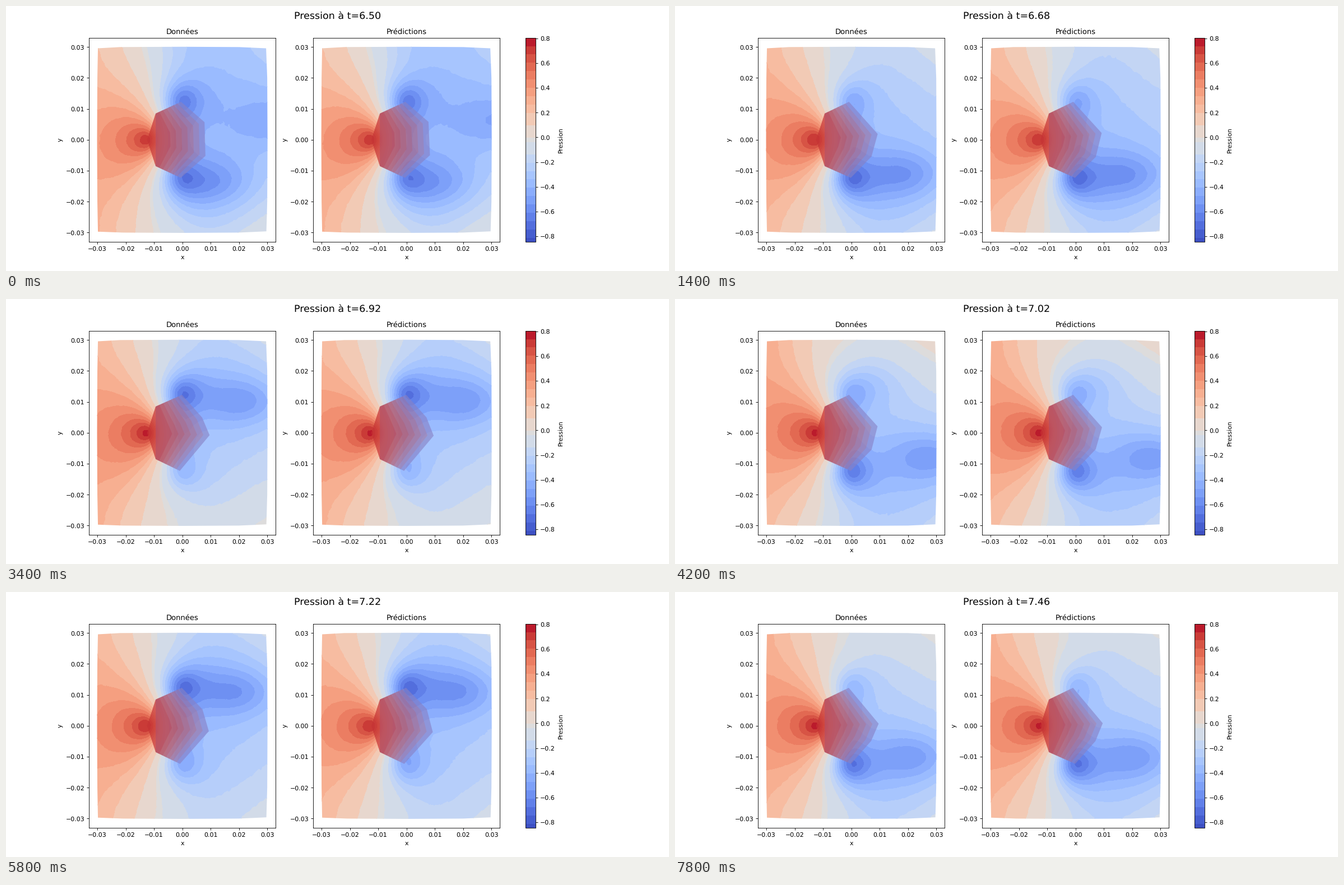
Write a matplotlib script that moves like this. It is 1183x473 px and loops after 8 s.

```python
import matplotlib.pyplot as plt
import numpy as np
from matplotlib.animation import FuncAnimation
from matplotlib.cm import ScalarMappable
from matplotlib.colors import BoundaryNorm, ListedColormap
from matplotlib.patches import Polygon
from matplotlib.path import Path
from matplotlib.tri import Triangulation

plt.rcParams["text.hinting"] = "none"

W, H, FRAMES, INTERVAL = 1183, 473, 40, 200
DPI = W / 15
PERIOD = 0.154      # vortex shedding period
UNIT = 0.01         # lengths below are in hundredths

# Colour bands: wide near neutral, narrower towards the ends
steps = np.concatenate([[-24.5], np.arange(-23.5, -3, 2), [-0.5, 0.5, 3.5],
                        np.arange(6.5, 25, 2)])
levels = -0.02 + steps * 1.65 / 49
centres = (steps[1:] + steps[:-1]) / 2
coolwarm = plt.get_cmap("coolwarm")
cmap = ListedColormap(coolwarm(0.5 + centres / 49))
norm = BoundaryNorm(levels, cmap.N)

# Irregular mesh
rng = np.random.default_rng(4)
N = 72
line = np.linspace(-3.03, 3.03, N)
gx, gy = np.meshgrid(line, line)
jitter = 0.3 * (line[1] - line[0])
inner = (abs(gx) < 3) & (abs(gy) < 3)
X = (gx + inner * rng.uniform(-jitter, jitter, gx.shape)).ravel()
Y = (gy + inner * rng.uniform(-jitter, jitter, gy.shape)).ravel()
grain = rng.normal(0, 0.0015, X.size)
mesh = Triangulation(X * UNIT, Y * UNIT)

rim = np.array([(-2.98, 2.96), (-2.2, 3), (0, 3.01), (2, 3), (2.96, 2.96),
                (3, 2), (3.01, 0), (3, -2), (2.97, -2.96), (2, -3),
                (0, -3.01), (-2.1, -3), (-2.98, -2.97), (-3, -2),
                (-3.01, 0), (-3, 2), (-2.98, 2.96)])
domain = Path(rim * UNIT)


def bump(cx, cy, sx, sy):
    return np.exp(-((X - cx) / sx) ** 2 / 2 - ((Y - cy) / sy) ** 2 / 2)


def wave(phase, peak):
    return np.cos(2 * np.pi * (phase - peak))


def smooth(v):
    v = np.clip(v, 0, 1)
    return v * v * (3 - 2 * v)


def steady_field():
    """Stagnation point ahead of the body, low pressure behind it."""
    r = np.hypot(X + 1.1, Y) + 1e-6
    ahead = -(X + 1.1) / r
    p = 0.32 / np.sqrt(r ** 2 + 0.16) - 0.1
    p += 0.38 * (1 - np.exp(-r / 0.4)) * np.exp(-r / 12) * ahead
    p -= 0.09 * np.exp(-((X - 0.4) / 1.3) ** 2 / 2)
    p += 0.09 * (X * Y / 9) ** 2
    return p - 0.2 * bump(-0.1, 0, 0.4, 0.8) + grain


steady = steady_field()
ramp = 0.4 + 0.6 / (1 + np.exp(-3 * (X + 0.7)))


def shed(phase, side):
    """Suction at one shoulder and the vortex that leaves it."""
    edge = 0.33 + 0.1 * wave(phase, 0.12)
    p = edge * (0.6 * bump(0.05, 1.3 * side, 0.66, 0.6)
                + 0.4 * bump(-0.05, 1.28 * side, 0.36, 0.33))
    s = (phase + 0.45) % 1 - 0.45
    gain = smooth((s + 0.45) / 0.35) * smooth((0.5 - s) / 0.3)
    cx, cy = 2 + 4.6 * s, side * (1.1 - 1.6 * s)
    p += gain * (0.17 * bump(cx, cy, 0.9, 0.5)
                 + 0.15 * bump(cx - 0.6, cy * 1.25, 1.35, 0.95))
    return p


def pressure(phase):
    p = steady + (0.07 + 0.06 * wave(2 * phase, 0.27)) * ramp
    p += 0.11 * wave(phase, 0.24) * ramp * Y / 3
    return p - shed(phase, -1) - shed(phase + 0.5, 1)


def rear_corner(a):
    return 0.8 + 0.135 * a + 0.035 * a * a, 0.55 - 0.215 * a - 0.285 * a * a


def body_layers(phase, count=7):
    """Blue core, then nested translucent red shapes, outermost first."""
    a = wave(phase, 0.1)
    nose = np.array([-1.24, 0])
    x1, y1 = rear_corner(a)
    x2, y2 = rear_corner(-a)
    front = np.array([-0.94, 0.85])
    top = np.array([-0.05 - 0.04 * a, 1.23])
    low = np.array([-0.05 + 0.04 * a, 1.23])
    flip = np.array([1, -1])
    for i in range(count, 0, -1):
        u = i / count
        k = 0.3 + 0.7 * u
        shape = np.array([
            nose, front, front + (top - front) * u,
            nose + ((x1, y1) - nose) * k,
            nose + ((x2, -y2) - nose) * k,
            (front + (low - front) * u) * flip, front * flip,
        ]) * UNIT
        if i == count:
            yield shape[1:], coolwarm(0.16), 0.55
        yield shape, coolwarm(1 - 0.12 * u), 0.16


fig, axes = plt.subplots(1, 2, dpi=DPI,
                         figsize=((W + 0.01) / DPI, (H + 0.01) / DPI))
ticks = np.round(np.linspace(-0.03, 0.03, 7), 2)
for ax, name in zip(axes, ("Données", "Prédictions")):
    ax.set(title=name, xlabel="x", ylabel="y", xticks=ticks, yticks=ticks,
           xlim=(-0.033, 0.033), ylim=(-0.033, 0.033))
bar = fig.colorbar(ScalarMappable(norm, cmap), ax=axes, label="Pression",
                   ticks=np.round(np.linspace(-0.8, 0.8, 9), 1),
                   spacing="proportional")
bar.minorticks_off()
heading = fig.suptitle("", fontsize=16)
drawn = []


def update(i):
    while drawn:
        drawn.pop().remove()
    t = 6.5 + 0.02 * int(1.23 * i + 0.6)
    heading.set_text(f"Pression à t={t:.2f}")
    phase = (t - 6.68) / PERIOD
    for ax, lag in zip(axes, (0, 0.012)):
        p = np.clip(pressure(phase - lag), levels[0] + 0.001, levels[-1] - 0.001)
        field = ax.tricontourf(mesh, p, levels=levels, cmap=cmap, norm=norm)
        field.set_clip_path(domain, ax.transData)
        drawn.append(field)
        for shape, color, alpha in body_layers(phase - lag):
            layer = Polygon(shape, facecolor=color, alpha=alpha, lw=0, zorder=1.5)
            drawn.append(ax.add_patch(layer))
        ax.set(xlim=(-0.033, 0.033), ylim=(-0.033, 0.033))
    return drawn


anim = FuncAnimation(fig, update, frames=FRAMES, interval=INTERVAL,
                     repeat=True, repeat_delay=0, blit=False)
plt.show()
```
